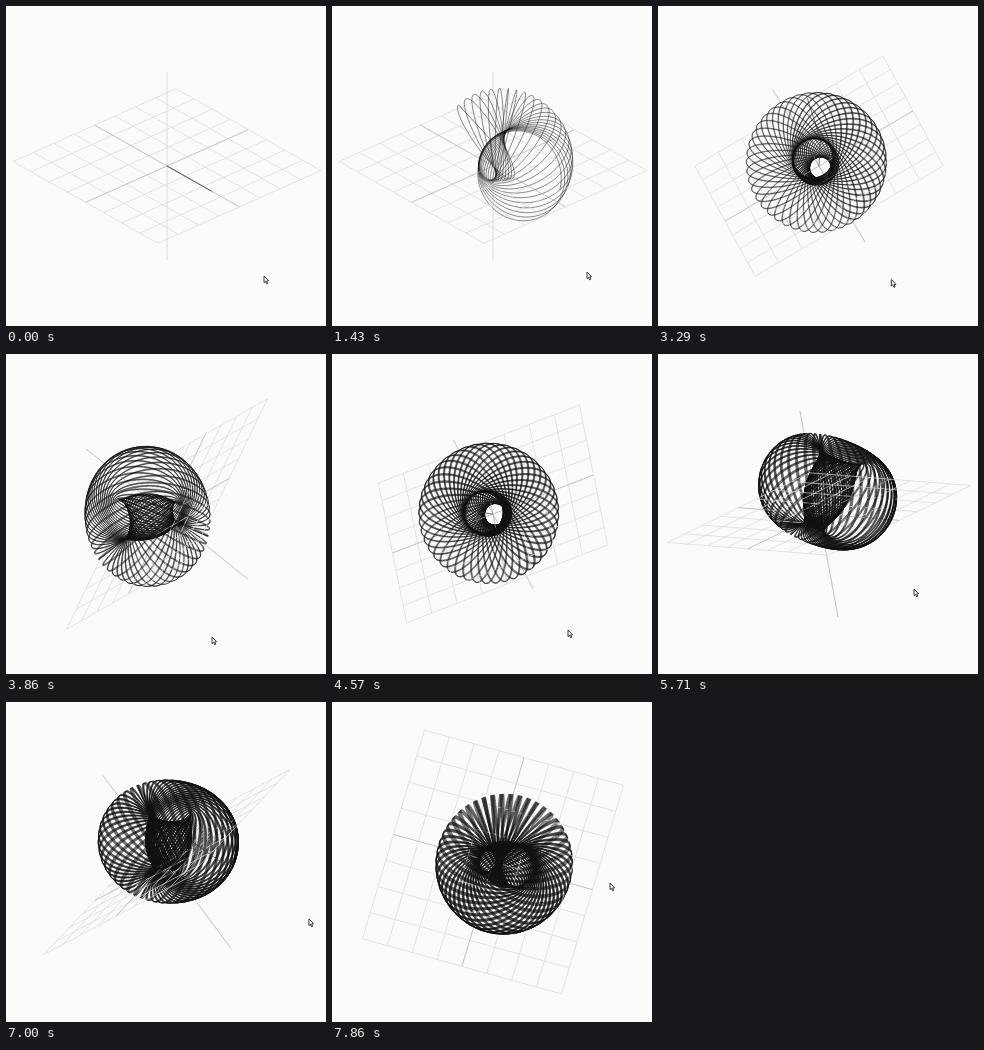
Animation, 320 px wide and 320 px high, one loop 8000 ms. Source, as an HTML page with a canvas:

```html
<!DOCTYPE html>
<html lang="en">
<head>
<meta charset="utf-8">
<title>Spinning coil</title>
<style>
  html, body { margin: 0; width: 100%; height: 100%; overflow: hidden; background: #fafcf9; }
  canvas { display: block; width: 100vw; height: 100vh; }
</style>
</head>
<body>
<canvas></canvas>
<script>
const LOOP = 8000, HALF = 109, CENTER = [161, 160];
const DRAW_START = 900, TURN_MS = 1000, COILS = 43.07, STEPS = 56;
const ORBIT_START = 2840;

// Each view: time, then the screen x and screen y of the three world axes.
const views = [
  [ORBIT_START, [72.5, 81.5, 0], [41, -36.5, -94.5]],
  [3860, [-38.6, 62, -81], [80, -35.5, -65]],
  [4570, [14, 100, -39.5], [70, -39, -74]],
  [5710, [71, 80.4, -19], [-35.1, 6.1, -103]],
  [7000, [72, 51, -64], [-38.5, -54, -86.5]],
  [7860, [99.5, 31, -32], [27, -104.5, -15]]
];
const pointer = [
  [ORBIT_START, [255, 266]], [3860, [206, 283]], [4570, [236, 276]],
  [5710, [256, 235]], [7000, [303, 217]], [7860, [278, 181]]
];

const canvas = document.querySelector('canvas');
const ctx = canvas.getContext('2d');

const dot = (a, b) => a.reduce((sum, v, i) => sum + v * b[i], 0);
const unit = a => a.map(v => v / Math.hypot(...a));
const mix = (a, b, k) => a.map((v, i) => v + (b[i] - v) * k);

function sample(keys, t) {
  if (t <= keys[0][0]) return keys[0].slice(1);
  const i = keys.findIndex(key => key[0] > t);
  if (i < 0) return keys[keys.length - 1].slice(1);
  const [from, to] = [keys[i - 1], keys[i]];
  const k = (t - from[0]) / (to[0] - from[0]);
  return from.slice(1).map((v, j) => mix(v, to[j + 1], k));
}

function camera(t) {
  const [rawX, rawY] = sample(views, t);
  const x = unit(rawX);
  const skew = dot(rawY, x);
  const y = unit(rawY.map((v, i) => v - skew * x[i]));
  const fromAbove = x[0] * y[1] - x[1] * y[0] < 0;
  return { x, y, fromAbove };
}

const project = (cam, p) => [CENTER[0] + dot(cam.x, p), CENTER[1] + dot(cam.y, p)];

// The coil turns about an axis halfway between world X and Z.
function aboutAxis(radial, side, height, angle) {
  const c = Math.cos(angle), s = Math.sin(angle), h = Math.SQRT1_2;
  const across = radial * c - side * s;
  return [h * (height + across), radial * s + side * c, h * (height - across)];
}

function coilPoint(turn) {
  const phi = Math.PI / 4 + turn * COILS * 2 * Math.PI;
  const s = Math.sin(phi);
  return aboutAxis(24 + 46 * Math.cos(phi), 5 + 19 * s, 24 + 46 * s, turn * 2 * Math.PI);
}

function line(cam, points, color, width) {
  ctx.beginPath();
  points.forEach(p => ctx.lineTo(...project(cam, p)));
  ctx.strokeStyle = color;
  ctx.lineWidth = width;
  ctx.stroke();
}

function drawGrid(cam) {
  for (let i = -4; i <= 4; i++) {
    const v = i * HALF / 4;
    const color = i ? '#d6d8d6' : '#a6a8a6';
    line(cam, [[v, -HALF, 0], [v, HALF, 0]], color, 0.7);
    line(cam, [[-HALF, v, 0], [HALF, v, 0]], color, 0.7);
  }
}

// Splits the coil at the grid plane so that the grid hides only what lies behind it.
function coilPaths(cam, turns) {
  const paths = { back: new Path2D(), front: new Path2D() };
  const count = Math.floor(turns * COILS * STEPS);
  let last = '', previous;
  for (let i = 0; i <= count; i++) {
    const p = coilPoint(i / (COILS * STEPS));
    const layer = (p[2] > 0) === cam.fromAbove ? 'front' : 'back';
    const at = project(cam, p);
    if (layer !== last) paths[layer].moveTo(...(previous || at));
    paths[layer].lineTo(...at);
    last = layer;
    previous = at;
  }
  return paths;
}

function strokeCoil(path) {
  ctx.strokeStyle = 'rgba(18,18,18,.82)';
  ctx.lineWidth = 0.6;
  ctx.stroke(path);
}

function drawPointer(t) {
  const [x, y] = t < 140 ? [258, 270] : sample(pointer, t)[0];
  ctx.save();
  ctx.translate(x, y);
  ctx.beginPath();
  [[0, 0], [0, 6.6], [1.5, 5.3], [2.6, 7.8], [3.7, 7.3], [2.7, 4.9], [4.6, 4.8]]
    .forEach(p => ctx.lineTo(...p));
  ctx.closePath();
  ctx.fillStyle = '#fff';
  ctx.fill();
  ctx.strokeStyle = '#222';
  ctx.lineWidth = 0.9;
  ctx.stroke();
  ctx.restore();
}

function draw(t) {
  const ratio = window.devicePixelRatio || 1;
  const w = Math.round(innerWidth * ratio), h = Math.round(innerHeight * ratio);
  if (canvas.width !== w || canvas.height !== h) {
    canvas.width = w;
    canvas.height = h;
  }
  ctx.setTransform(w / 320, 0, 0, h / 320, 0, 0);
  ctx.fillStyle = '#fafcf9';
  ctx.fillRect(0, 0, 320, 320);
  ctx.lineJoin = 'round';

  const cam = camera(t);
  const turns = (t - DRAW_START) / TURN_MS;
  const paths = turns > 0 ? coilPaths(cam, turns) : null;

  line(cam, [[0, 0, -HALF], [0, 0, HALF]], t < ORBIT_START ? '#cfd1cf' : '#a8aaa8', 0.7);
  if (paths) strokeCoil(paths.back);
  drawGrid(cam);
  if (paths) {
    const joint = aboutAxis(24, 0, 24, turns * 2 * Math.PI);
    line(cam, [[0, 0, 0], joint, coilPoint(turns)], '#444', 0.7);
    strokeCoil(paths.front);
  } else {
    line(cam, [[0, 0, 0], [67, 0, 0]], '#444', 0.9);
  }
  drawPointer(t);
}

const start = performance.now();
function tick() {
  draw((performance.now() - start) % LOOP);
  requestAnimationFrame(tick);
}
tick();
</script>
</body>
</html>
```
